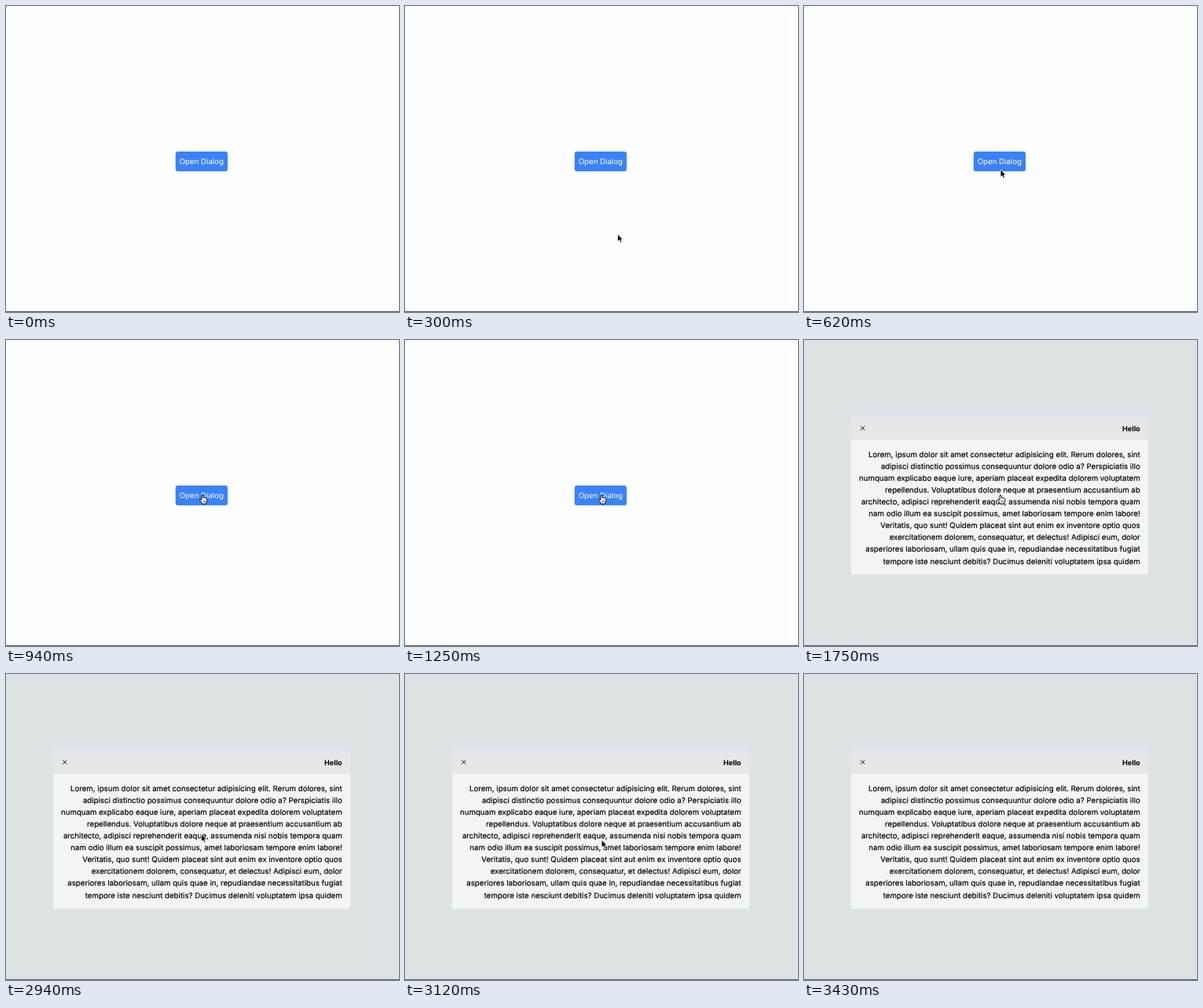
These frames come from a looping animation (500x389 px, 3.95 s). An HTML page:

```html
<!DOCTYPE html>
<html lang="en">
<head>
<meta charset="utf-8">
<title>Dialog demo</title>
<style>
  html, body { margin: 0; width: 100%; height: 100%; overflow: hidden; background: #fefefe; }
  svg { display: block; width: 500px; height: 389px; }
  text { font: 9.69px Inter, "Open Sans", sans-serif; text-rendering: geometricPrecision; }
  .right { text-anchor: end; }
  .title { font-size: 9.1px; font-weight: 700; }
</style>
</head>
<body>
<svg viewBox="0 0 500 389">
  <rect width="500" height="389" fill="#fefefe"/>
  <g id="page">
    <rect x="215.7" y="185" width="66.3" height="25.3" rx="3.2" fill="#3b82f6"/>
    <text x="248.8" y="201.4" text-anchor="middle" fill="#fff">Open Dialog</text>
  </g>
  <g id="dialog">
    <rect width="500" height="389" fill="#dde2e5"/>
    <rect x="60" y="97" width="378" height="201.3" fill="#f2f4f5"/>
    <rect x="60" y="97" width="378" height="30" fill="#e5e7ea"/>
    <path d="M72.2 109.6l5 5m0-5l-5 5" stroke="#111" stroke-width="1"/>
    <text class="right title" x="427.7" y="116">Hello</text>
    <g id="body" fill="#000" stroke="#000" stroke-width=".18"></g>
  </g>
  <path id="arrow" d="M0 0V9.6L2.2 7.6L3.7 11L5.4 10.2L4 7H6.9Z" fill="#000" stroke="#fff" stroke-width=".8"/>
  <g id="hand" stroke="#000" stroke-width=".9" stroke-linejoin="round">
    <path d="M-1 6.5V.9Q0-.6 1 .9V3.6Q2 2.6 2.9 3.9Q4 3.1 4.6 4.4Q5.8 4 5.8 5.4V7.6Q5.6 9 4.7 10V11.3H-.7V10.2L-3.4 6.6Q-3.8 5 -2.3 5.3Z" fill="#fff"/>
    <path d="M1 7.2V9.4M2.5 7.2V9.4M4 7.2V9.4" stroke-width=".6"/>
  </g>
  <rect y="388" width="500" height="1" fill="#55575a"/>
</svg>
<script>
const LOOP = 3950, OPEN = 1750;
const lines = [
  "Lorem, ipsum dolor sit amet consectetur adipisicing elit. Rerum dolores, sint",
  "adipisci distinctio possimus consequuntur dolore odio a? Perspiciatis illo",
  "numquam explicabo eaque iure, aperiam placeat expedita dolorem voluptatem",
  "repellendus. Voluptatibus dolore neque at praesentium accusantium ab",
  "architecto, adipisci reprehenderit eaque, assumenda nisi nobis tempora quam",
  "nam odio illum ea suscipit possimus, amet laboriosam tempore enim labore!",
  "Veritatis, quo sunt! Quidem placeat sint aut enim ex inventore optio quos",
  "exercitationem dolorem, consequatur, et delectus! Adipisci eum, dolor",
  "asperiores laboriosam, ullam quis quae in, repudiandae necessitatibus fugiat",
  "tempore iste nesciunt debitis? Ducimus deleniti voluptatem ipsa quidem"
];
const el = id => document.getElementById(id);
const show = (node, on) => node.setAttribute("visibility", on ? "visible" : "hidden");
const page = el("page"), dialog = el("dialog"), arrow = el("arrow"), hand = el("hand");

el("body").innerHTML = lines.map((line, i) =>
  `<text class="right" x="427.7" y="${149 + i * 15.06}">${line}</text>`).join("");

// The pointer moves in discrete steps.
const progress = (t, start, end, steps) =>
  Math.min(1, Math.floor((t - start) / (end - start) * steps + 1e-6) / steps);

function pointer(t) {
  if (t < 140) return null;
  if (t < 710) {
    const rest = (1 - progress(t, 140, 620, 5)) ** 2;
    return [arrow, 250 + 32 * rest, 208 + 128 * rest];
  }
  if (t < 2940) {
    const p = progress(t, 710, 940, 2);
    return [hand, 250, 201 - 4 * p];
  }
  if (t < 3430) {
    const p = progress(t, 2940, 3430, 5);
    return [arrow, 248.5 + 8 * p, 203.5 + 185 * p * p];
  }
  return null;
}

function draw(t) {
  const isOpen = t >= OPEN, at = pointer(t);
  show(page, !isOpen);
  show(dialog, isOpen);
  for (const node of [arrow, hand]) show(node, at && at[0] === node);
  if (at) at[0].setAttribute("transform", `translate(${at[1]} ${at[2]})`);
}

const began = performance.now();
function tick() {
  draw((performance.now() - began) % LOOP);
  requestAnimationFrame(tick);
}
tick();
</script>
</body>
</html>
```
